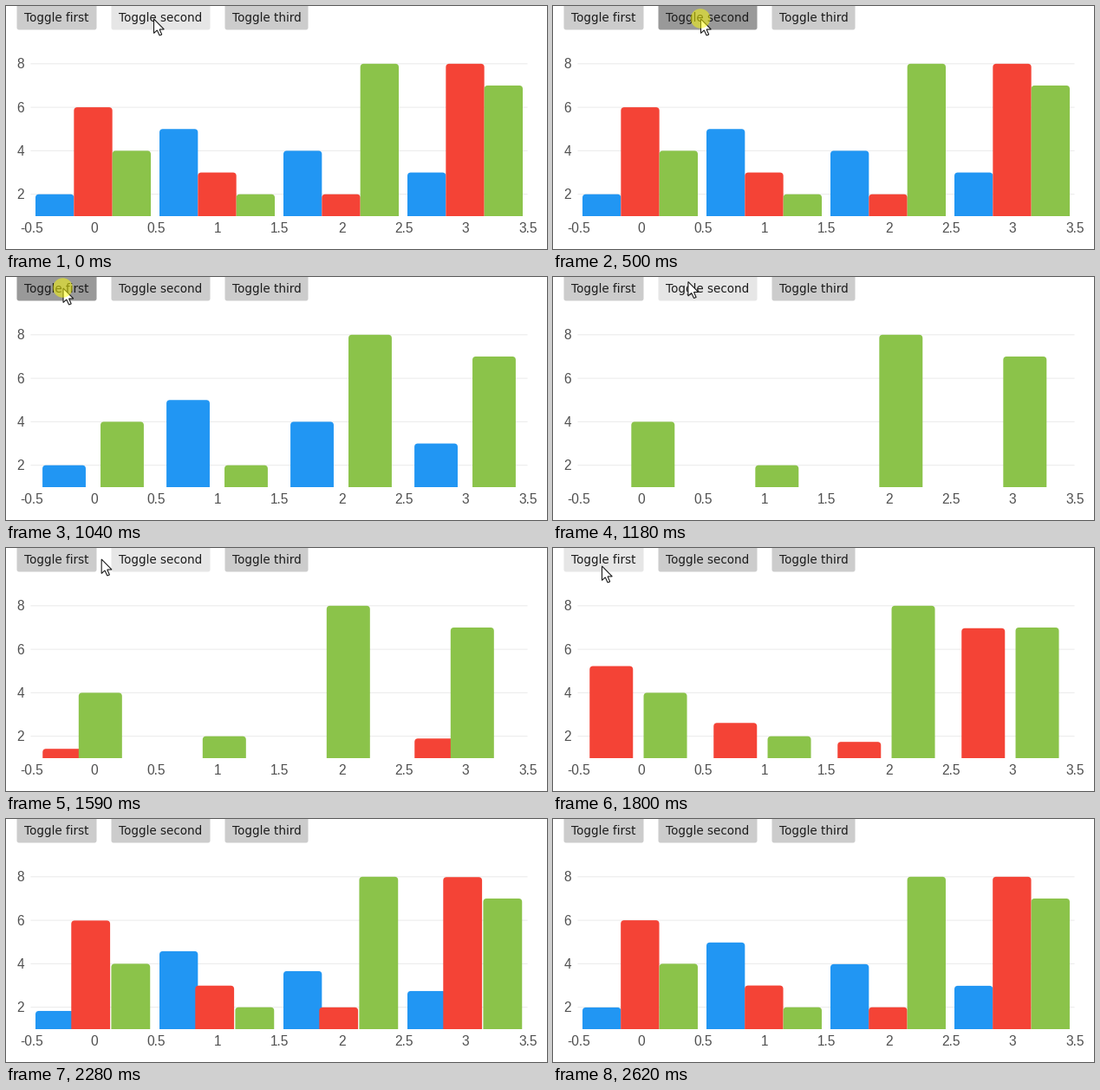
Recreate the animation shown at these times as a matplotlib script. Size 624 by 281 pixels, loop 3.12 s.

```python
import numpy as np
import matplotlib.pyplot as plt
from matplotlib.animation import FuncAnimation
from matplotlib.patches import Circle, FancyBboxPatch, Polygon, Rectangle

W, H, DPI = 624, 281, 100
LOOP, TICK = 3120, 10
FIRST, STEP, LAST = 500, 68.39, 31

DATA = [[2, 5, 4, 3], [6, 3, 2, 8], [4, 2, 8, 7]]
COLORS = ["#2196f3", "#f44336", "#8bc34a"]
UNIT_X, UNIT_Y = 143, 25.15
LEFT, RIGHT, FLOOR, ZERO = 29, 601, 243, 268
GROUP, MAX_BAR = 133, 50

# (time, index of the toggled series, where the pointer goes next)
HOME = (170.5, 15)
TOGGLES = [(598, 1, (66, 13)), (1090, 0, (167.5, 4.5)),
           (1563, 1, (56, 21)), (1993, 0, (-60, -30))]
BAR_MS, MOVE_MS, PRESS_MS = 800, 300, 120

BUTTONS = {"first": 92, "second": 114, "third": 96}
NORMAL, HOVER, DOWN = "#cccccc", "#e6e6e6", "#999999"
ARROW = np.array([(0, 0), (0, 16.5), (3.8, 13), (6.6, 19), (9.2, 18), (6.6, 12), (11.8, 12)])


def px(size):
    return size * 72 / DPI


def ease_out(t):
    return 1 if t >= 1 else 1 - 2 ** (-10 * t)


def layout(shown):
    """Offset from the group centre, width and height scale of each visible series."""
    slot = GROUP / len(shown)
    width = min(slot, MAX_BAR)
    return {s: np.array([-GROUP / 2 + slot * (i + 0.5) - width / 2, width, 1.0])
            for i, s in enumerate(sorted(shown))}


def bar_state(t):
    shown = {0, 1, 2}
    goal = layout(shown)
    start, began = goal, -BAR_MS

    def at(time):
        p = ease_out((time - began) / BAR_MS)
        return {s: start[s] + (goal[s] - start[s]) * p for s in goal}

    for when, series, _ in TOGGLES:
        if t < when:
            break
        now = at(when)
        shown ^= {series}
        goal = layout(shown)
        # a returning series grows from zero height at its final place
        start = {s: now.get(s, goal[s] * [1, 1, 0]) for s in goal}
        began = when
    return at(t)


def pointer(t):
    pos = np.array(HOME)
    for when, _, stop in TOGGLES:
        if t >= when:
            pos = pos + (stop - pos) * ease_out((t - when) / MOVE_MS)
    return pos


fig = plt.figure(figsize=(W / DPI, H / DPI), dpi=DPI, facecolor="white")
ax = fig.add_axes([0, 0, 1, 1])
ax.set(xlim=(0, W), ylim=(H, 0))
ax.axis("off")


def label(x, y, text, size, color, font):
    ax.text(x, y, text, fontsize=px(size), color=color, family=font,
            ha="center", va="baseline", zorder=6)


def tick_label(x, y, value):
    label(x, y, f"{value:g}", 15.5, "#505050", "Liberation Sans")


def round_box(x, y, w, h, r, color, z):
    box = FancyBboxPatch((x, y), w, h, boxstyle=f"round,pad=0,rounding_size={r}",
                         fc=color, ec="none", zorder=z)
    return ax.add_patch(box)


for value in range(2, 10, 2):
    y = ZERO - value * UNIT_Y
    ax.plot([LEFT, RIGHT], [y, y], color="#ebebeb", lw=px(1), snap=False, zorder=1)
    tick_label(17, y + 5.5, value)
for i in range(9):
    tick_label(LEFT + 0.7 + i * UNIT_X / 2, 262, i / 2 - 0.5)

buttons = []
x = 12.5
for name, width in BUTTONS.items():
    buttons.append(round_box(x, -8, width, 35.5, 2.5, NORMAL, 5))
    label(x + width / 2, 18, "Toggle " + name, 13.5, "#1c1c1c", "DejaVu Sans")
    x += width + 17

plot_area = Rectangle((0, 0), W, FLOOR, transform=ax.transData)
bars = []
for s, color in enumerate(COLORS):
    bars.append([round_box(0, 0, 44, 40, 4, color, 2 + s) for _ in DATA[s]])
    for bar in bars[s]:
        bar.set_clip_path(plot_area)

arrow = ax.add_patch(Polygon(ARROW, fc="white", ec="#1a1a1a", lw=px(1.1), zorder=8))
glow = ax.add_patch(Circle((0, 0), 11.3, fc="#ffff00", ec="none", alpha=0.5, zorder=9))


def draw(frame):
    t = frame * TICK
    k = min((t + TICK - 1 - FIRST) // STEP, LAST)
    t = FIRST + STEP * k if k >= 0 else 0

    state = bar_state(t)
    for s, group in enumerate(bars):
        for i, bar in enumerate(group):
            dx, width, scale = state.get(s, (0, 0, 0))
            height = DATA[s][i] * UNIT_Y * scale
            centre = LEFT + UNIT_X * (i + 0.5)
            bar.set_bounds(centre + dx, ZERO - height, width, height)
            bar.set_visible(ZERO - height < FLOOR)

    x, y = pointer(t)
    pressed = any(when - PRESS_MS <= t < when for when, *_ in TOGGLES)
    over = 1 if x >= 105 else 0 if x >= 12 else None
    for i, button in enumerate(buttons):
        active = DOWN if pressed else HOVER
        button.set_facecolor(active if i == over else NORMAL)
    arrow.set_xy(ARROW + (x, y))
    glow.center = (x - 0.5, y - 0.5)
    glow.set_visible(pressed)
    return []


anim = FuncAnimation(fig, draw, frames=LOOP // TICK, interval=TICK,
                     init_func=lambda: draw(0), repeat=True, repeat_delay=0)
plt.show()
```
